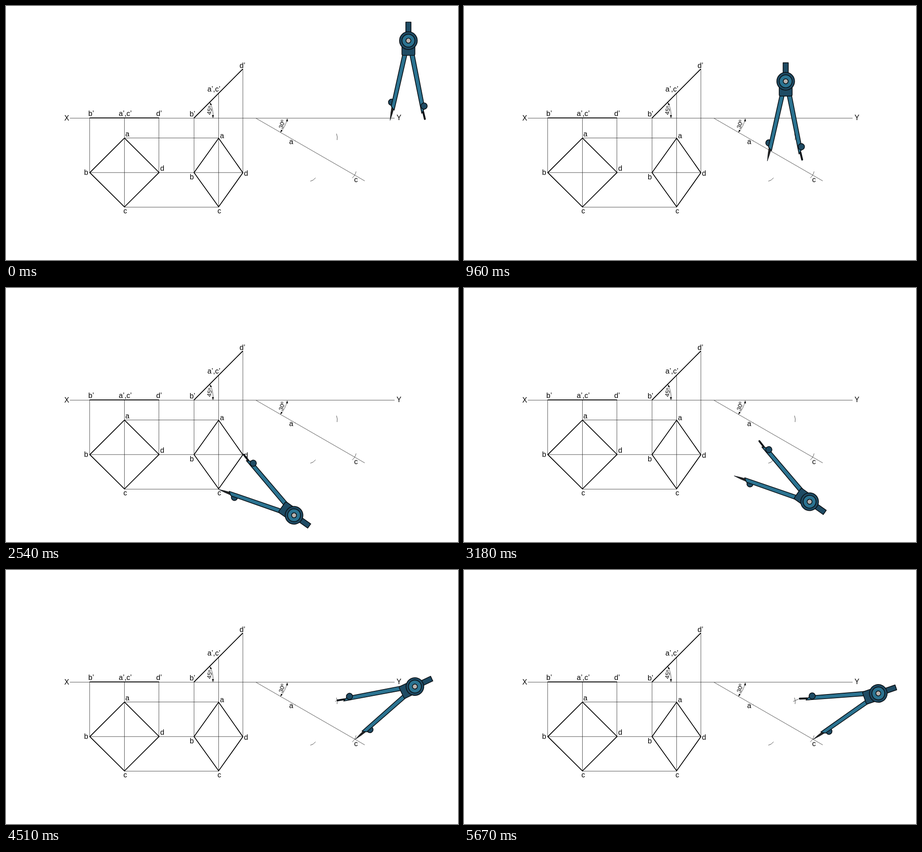
An HTML page for the animation above (5710 ms loop, 998 by 561 pixels).

```html
<!DOCTYPE html>
<html lang="en">
<head>
<meta charset="utf-8">
<title>Compass construction</title>
<style>
  html, body { margin: 0; width: 100%; height: 100%; overflow: hidden; background: #fff; }
  svg { display: block; }
  text { font: 16px "Liberation Sans", Arial, sans-serif; text-anchor: middle; }
  .thin { fill: none; stroke: #222; stroke-width: .8; }
  .bold { fill: none; stroke: #000; stroke-width: 1.8; }
  .small { font-size: 13px; }
  #compass { stroke: #0b1116; stroke-width: 1.7; stroke-linejoin: round; }
  .dark { fill: #1e4b64; }
  .teal { fill: #2b7391; }
</style>
</head>
<body>
<svg width="998" height="561" viewBox="0 0 998 561">
  <!-- projectors and axes -->
  <path class="thin" d="M141 247.8H858 M184.7 248V368 M261.5 248V444 M337.6 248V368
    M261.5 291.5H469.5 M185 367.9H523 M261.5 444.3H469.5
    M415.2 248V368 M469.5 192V444 M523 139V368 M552 248L792 386.3"/>
  <!-- views of the square -->
  <path class="bold" d="M184.5 247.2H338 M261.5 291.7L338 367.7L261.5 443.8L185 368Z
    M469.5 292L523 368.3L469.5 443.5L415.2 368Z M415 247.5L523 139"/>
  <!-- angle dimensions and compass marks -->
  <path class="thin" d="M450 213A58 58 0 0 1 457 247 M621 249A66 66 0 0 1 606 279
    M729.7 282Q732.5 289 731 296 M672 387Q678 386 683.5 379.5 M773 365.5Q771 374 764.5 380
    M637.5 297.3L639 298.7"/>
  <path d="M449.5 212.5l5.2 5.2l-3.2 1.6z M457 247.5l-2.2-6.5h4.2z
    M621 248.5l1.6 6.5l-4-.6z M605.7 279.3l1.8-6.2l3 2.6z"/>
  <text class="small" transform="translate(454 231.5) rotate(-79)">45º</text>
  <text class="small" transform="translate(613.5 262.5) rotate(-72)">30º</text>
  <g id="labels"></g>
  <path id="trace" class="thin"/>
  <g id="compass">
    <g id="needle">
      <circle class="dark" cx="-37" cy="136" r="7"/>
      <path fill="#222" stroke-width=".8" d="M-37 147L-32.5 151L-36 163L-40.5 176L-39 160Z"/>
      <path class="teal" d="M-12.5 30H-3L-31.5 153.5L-38 145Z"/>
    </g>
    <g id="pencil">
      <path d="M32.5 157L36.3 173" stroke-width="4.2" stroke-linecap="round"/>
      <path class="teal" d="M3 30H12.8L36 149L29.5 160.5Z"/>
      <circle class="dark" cx="34.5" cy="144.5" r="7"/>
    </g>
    <path class="dark" d="M-5.7 -41H5.7V-15H-5.7Z M-14.3 10H14.3V29.5Q14.3 32.5 11.3 32.5H-11.3Q-14.3 32.5 -14.3 29.5Z"/>
    <circle class="dark" r="19.6"/>
    <circle class="teal" r="14.2"/>
    <circle fill="#b8b3b0" r="5.5"/>
  </g>
</svg>
<script>
const LOOP = 5710;
const $ = id => document.getElementById(id);

const labels = [
  ['X', 134, 253], ['Y', 867.5, 252], ['b’', 188, 243], ['a’,c’', 263.3, 243], ['d’', 338, 243],
  ['b’', 411.7, 243.5], ['a’,c’', 459, 189], ['d’', 522, 137],
  ['a', 268, 287.7], ['b', 177, 373], ['d', 345, 364.2], ['c', 263.3, 457.7],
  ['a', 477, 291.7], ['b', 410.3, 382.5], ['d', 530, 375], ['c', 471, 457.7],
  ['a', 629.7, 305.3], ['c', 772.7, 388.5]
];
$('labels').innerHTML = labels.map(([s, x, y]) => `<text x="${x}" y="${y}">${s}</text>`).join('');

// Quadratic ease-in-out progress between two times
function ease(t, from, to) {
  const x = Math.min(1, Math.max(0, (t - from) / (to - from)));
  return x < .5 ? 2 * x * x : 1 - 2 * (1 - x) ** 2;
}
const mix = (a, b, p) => a + (b - a) * p;

function pose(transform, needle, pencil) {
  $('compass').setAttribute('transform', transform);
  $('needle').setAttribute('transform', needle);
  $('pencil').setAttribute('transform', pencil);
}

// Arc swept by the pencil around point c
function arc(from, to) {
  const point = deg => {
    const a = deg * Math.PI / 180;
    return `${771 + 94 * Math.cos(a)} ${373.5 + 94 * Math.sin(a)}`;
  };
  return `M${point(from)}A94 94 0 0 1 ${point(to)}`;
}

function draw(t) {
  let trace = '';
  if (t < 1960) {
    const p = ease(t, 110, 1865);
    pose(`translate(${mix(888.5, 509.5, p)} ${mix(76.5, 267.5, p)})`, '', '');
  } else {
    // Opened to length cd; the needle tip is the pivot
    const p = t < 3940 ? ease(t, 2570, 3900) : 1;
    const swing = Math.max(0, t - 4230) * .00543;
    const turn = t < 3940 ? 0 : swing - 62;
    pose(`translate(${mix(470, 771, p)} ${mix(444.5, 373.5, p)}) rotate(${turn})
      translate(166 57.5) rotate(125.2) scale(-1 1)`,
      'rotate(3.3) scale(.975)', 'rotate(-3.3) scale(.983)');
    if (swing) trace = arc(-118, -118 + swing);
  }
  $('trace').setAttribute('d', trace);
}

function tick() {
  draw(performance.now() % LOOP);
  requestAnimationFrame(tick);
}
tick();
</script>
</body>
</html>
```
